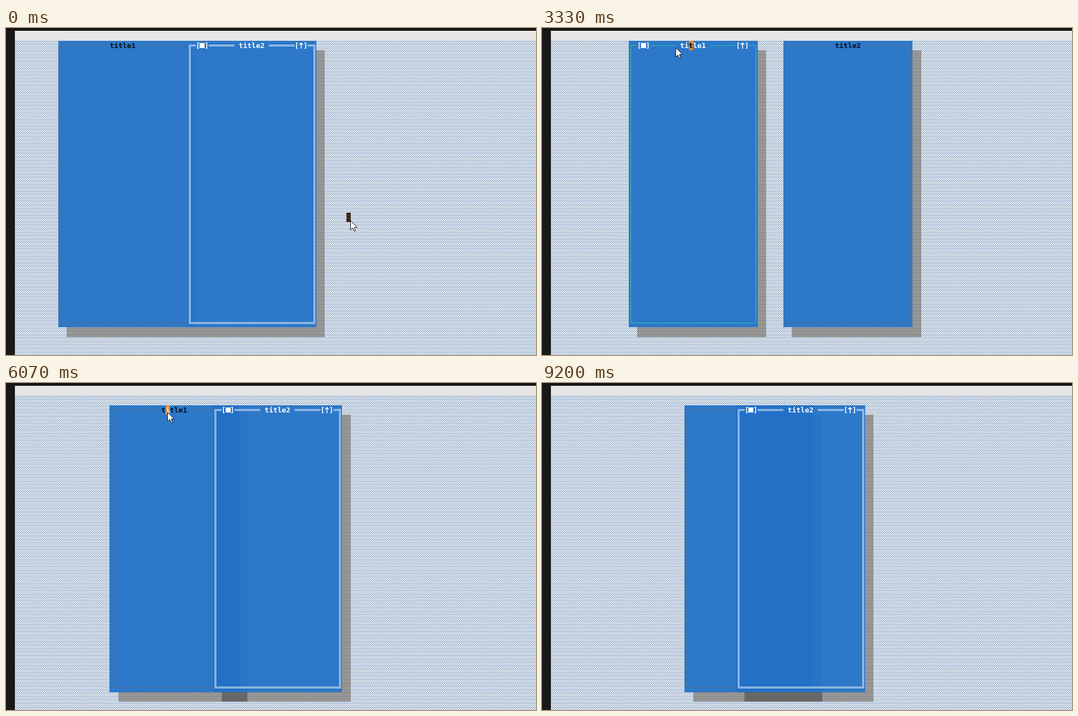
An HTML page with a canvas for the animation above (9670 ms loop, 953 by 588 pixels).

```html
<!DOCTYPE html>
<html lang="en">
<head>
<meta charset="utf-8">
<title>Text windows</title>
<style>
  html, body { margin: 0; width: 100%; height: 100%; overflow: hidden; background: #191919; }
  canvas { display: block; }
</style>
</head>
<body>
<canvas id="stage" width="953" height="588"></canvas>
<script>
const W = 953, H = 588, LOOP = 9670, FPS = 15, FRAMES = 145;
const CELL_W = 7.735, CELL_H = 17.2, LEFT = 16.3, TOP = 5.3, SIZE = 30;
const GLIDE = 4; // ticks a pointer move takes at most
const ctx = document.getElementById('stage').getContext('2d');

const px = col => LEFT + col * CELL_W;
const py = row => TOP + row * CELL_H;

// The pointer rests at each stop, then glides to the next
const stops = [];
const stop = (tick, col, row) => stops.push({ tick, col, row });
const drags = [];
const drag = (win, press, release) => drags.push({ win, press, release });

stop(0, 77.9, 19.8);
stop(7, 53.7, 2.8);
stop(24, 54.6, 1.7);
drag(1, 30, 39);
stop(33, 68.6, 1.7);
stop(45, 24.5, 1.7);
drag(0, 46, 62);
stop(49, 32.4, 1.7);
stop(53, 22.5, 1.7);
stop(58, 36.5, 2.1);
stop(67, 67.7, 1.6);
drag(1, 69, 84);
stop(74, 47.5, 2.3);
stop(80, 59.5, 2.3);
stop(90, 35.4, 2.7);
drag(0, 92, 102);
stop(97, 49.4, 2.7);
stop(99, 44.4, 2.7);
stop(105, 69.8, 3.05);
stop(108, 69.5, 2.5);
drag(1, 108, 122);
stop(112, 55.5, 2.5);
stop(116, 68.5, 2.5);
stop(118, 66.5, 2.5);
stop(126, 97.8, 30.4);
stop(137, 45.5, 36);

function pointerAt(tick) {
  const i = stops.findIndex(s => s.tick >= tick);
  if (i < 0) return stops[stops.length - 1];
  const b = stops[i], a = stops[i - 1] || b;
  const span = Math.min(GLIDE, b.tick - a.tick) || 1;
  const left = Math.min(1, (b.tick - tick) / span) ** 1.5;
  return { col: b.col + (a.col - b.col) * left, row: b.row + (a.row - b.row) * left };
}

// The terminal sees the mouse one tick late
function cellAt(tick) {
  const { col, row } = pointerAt(Math.max(0, tick - 1));
  return { col: Math.floor(col), row: Math.floor(row) };
}

function simulate() {
  const states = [], wins = [
    { title: 'title1', col: 10, row: 1 },
    { title: 'title2', col: 40, row: 1 }
  ];
  let top = 1, grip;
  for (let tick = 0; tick < FRAMES; tick++) {
    const cell = cellAt(tick);
    const held = drags.find(d => tick >= d.press && tick < d.release);
    if (held) {
      top = held.win;
      const win = wins[top];
      if (tick === held.press) grip = { col: cell.col - win.col, row: cell.row - win.row };
      win.col = cell.col - grip.col;
      win.row = cell.row - grip.row;
    }
    states.push({
      wins: [wins[1 - top], wins[top]].map(w => ({ ...w })),
      dragging: !!held, cell, pointer: pointerAt(tick)
    });
  }
  return states;
}

function hatch(dot) {
  const c = document.createElement('canvas');
  c.width = W; c.height = H;
  const g = c.getContext('2d');
  g.fillStyle = '#e6e6e6';
  g.fillRect(0, 0, W, H);
  g.fillStyle = dot;
  const dx = CELL_W / 4, dy = CELL_H / 10;
  for (let j = 0; py(1) + j * dy < H; j++)
    for (let i = j % 2; px(0) + i * dx < W; i += 2)
      g.fillRect(px(0) + i * dx, Math.round(py(1) + j * dy), 1.1, 1);
  return ctx.createPattern(c, 'no-repeat');
}

const desk = hatch('#2470c8'), dimDesk = hatch('#777');
const states = simulate();
const shade = 'rgba(0,0,0,.3)';

function cellRect(col, row, cols, rows) {
  const x = Math.round(px(col)), y = Math.round(py(row));
  return [x, y, Math.round(px(col + cols)) - x, Math.round(py(row + rows)) - y];
}

function fillCells(col, row, cols, rows, style) {
  ctx.fillStyle = style;
  ctx.fillRect(...cellRect(col, row, cols, rows));
}

function shadow({ col, row }, style) {
  fillCells(col + SIZE, row + 1, 2, SIZE - 1, style);
  fillCells(col + 2, row + SIZE, SIZE, 1, style);
}

// Windows are slightly translucent: what lies below tints them
function body({ col, row }, below) {
  ctx.save();
  ctx.beginPath();
  ctx.rect(...cellRect(col, row, SIZE, SIZE));
  ctx.clip();
  ctx.fillStyle = '#ebfbe0';
  ctx.fillRect(0, 0, W, H);
  if (below) {
    shadow(below, shade);
    fillCells(below.col, below.row, SIZE, SIZE, '#2d78c9');
  }
  fillCells(col, row, SIZE, SIZE, 'rgba(35,113,200,.95)');
  ctx.restore();
}

function border({ col, row }, active, dragging) {
  const spans = active ? [[0, 2], [5, 11], [19, 25], [28, 30]] : [[0, 11], [19, 30]];
  ctx.save();
  ctx.beginPath();
  for (const [a, b] of spans) ctx.rect(px(col + a), py(row), (b - a) * CELL_W, CELL_H);
  ctx.rect(px(col), py(row + 1), SIZE * CELL_W, (SIZE - 1) * CELL_H);
  ctx.clip();
  ctx.lineWidth = 1;
  ctx.strokeStyle = !active ? '#52708f' : dragging ? '#35c4a8' : '#e4edf8';
  for (const d of active && !dragging ? [-1, 1] : [0]) {
    const x = Math.round(px(col + .5) + d), y = Math.round(py(row + .5) + d);
    const right = Math.round(px(col + SIZE - .5) - d), bottom = Math.round(py(row + SIZE - .5) - d);
    ctx.strokeRect(x + .5, y + .5, right - x, bottom - y);
  }
  ctx.restore();
}

function label(text, col, row) {
  ctx.fillText(text, px(col), py(row) + 13.3);
}

function icons({ col, row }) {
  label('[ ]', col + 2, row);
  label('[ ]', col + 25, row);
  ctx.fillRect(Math.round(px(col + 3.5) - 4.5), Math.round(py(row) + 4.5), 9, 9);
  const x = px(col + 26.5), y = py(row) + 4;
  ctx.beginPath();
  ctx.moveTo(x, y + 10.5);
  ctx.lineTo(x, y);
  ctx.moveTo(x - 3.2, y + 3.6);
  ctx.lineTo(x, y + .4);
  ctx.lineTo(x + 3.2, y + 3.6);
  ctx.strokeStyle = '#fff';
  ctx.lineWidth = 1.6;
  ctx.stroke();
}

function drawWindow(win, below, active, dragging) {
  shadow(win, shade);
  body(win, below);
  border(win, active, dragging);
  ctx.fillStyle = active ? '#fff' : '#0a0d14';
  label(win.title, win.col + 12, win.row);
  if (active) icons(win);
}

function drawPointer({ col, row }) {
  ctx.save();
  ctx.translate(Math.round(px(col)), Math.round(py(row)));
  ctx.beginPath();
  ctx.moveTo(.5, .5);
  for (const [x, y] of [[.5, 17], [4.4, 13.5], [7, 19.5], [9.6, 18.5], [7.1, 12.6], [12.2, 12.3]])
    ctx.lineTo(x, y);
  ctx.closePath();
  ctx.fillStyle = '#fff';
  ctx.fill();
  ctx.strokeStyle = '#111';
  ctx.lineWidth = 1;
  ctx.stroke();
  ctx.restore();
}

function draw({ wins, dragging, cell, pointer }) {
  ctx.fillStyle = desk;
  ctx.fillRect(0, 0, W, H);
  wins.forEach(w => shadow(w, dimDesk));
  ctx.font = 'bold 12.85px "DejaVu Sans Mono", monospace';
  drawWindow(wins[0], null, false, false);
  drawWindow(wins[1], wins[0], true, dragging);

  ctx.fillStyle = '#e6e4e4';
  ctx.fillRect(16, 5, W, 17);
  ctx.fillStyle = '#191919';
  ctx.fillRect(0, 0, 16, H);
  ctx.fillStyle = '#181314';
  ctx.fillRect(0, 0, W, 5);

  // The text cursor inverts its cell
  ctx.globalCompositeOperation = 'difference';
  fillCells(cell.col, cell.row, 1, 1, '#fff');
  ctx.globalCompositeOperation = 'source-over';
  drawPointer(pointer);
}

const start = performance.now();
function play() {
  const t = Math.max(0, performance.now() - start) % LOOP;
  draw(states[Math.min(FRAMES - 1, Math.floor((t + 4) * FPS / 1000))]);
  requestAnimationFrame(play);
}
play();
</script>
</body>
</html>
```
